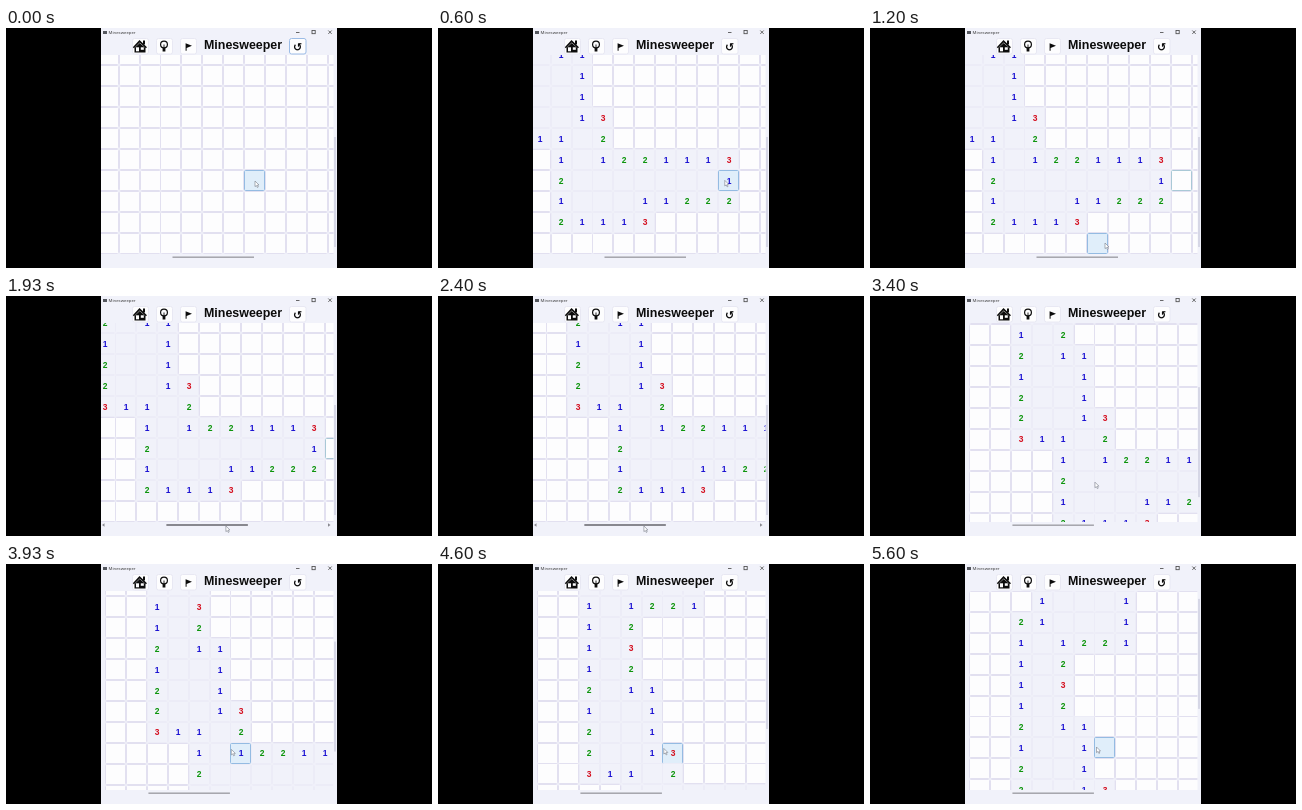
An HTML page with a canvas for the animation above (5670 ms loop, 426 by 240 pixels).

```html
<!DOCTYPE html>
<html lang="en">
<head>
<meta charset="utf-8">
<title>Minesweeper</title>
<style>
html, body { margin: 0; width: 100%; height: 100%; overflow: hidden; background: #000; }
canvas { display: block; width: 426px; height: 240px; }
</style>
</head>
<body>
<canvas id="stage" width="426" height="240"></canvas>
<script>
const ctx = document.getElementById('stage').getContext('2d');
const LOOP = 5670, TICK = 200 / 3;
const SIZE = 20.93, COLS = 15, ROWS = 16;
const LEFT = 28.9, TOP = -109.1;         // board corner before scrolling
const CLICK = 400, FOCUS = 730;
const BACK = '#f1f2fa', PAPER = '#fdfdfe', RIM = '#e2e0f0', BLACK = '#0c0c0c';
const INK = { 1: '#1a10d2', 2: '#0d950d', 3: '#d41020' };
const VIEW = { x: 95, y: 27, w: 232.5, h: 199 };

const MINES = [
  '..*.....*', '', '.*', '.....**', '.....*', '.*...*', '', '.*',
  '......*', '.*.....*', '.*.....**..*.*', '...*.........*', '', '...*',
  '.........*.**', '.....*..**'
];

const isMine = (c, r) => MINES[r] !== undefined && MINES[r][c] === '*';

function around(c, r) {
  const list = [];
  for (let y = r - 1; y <= r + 1; y++)
    for (let x = c - 1; x <= c + 1; x++)
      if (x >= 0 && y >= 0 && x < COLS && y < ROWS) list.push([x, y]);
  return list;
}

// Opening an empty cell opens its neighbours too.
const opened = new Map();
function open(c, r) {
  const id = r * COLS + c;
  if (opened.has(id)) return;
  const near = around(c, r);
  const count = near.filter(([x, y]) => isMine(x, y)).length;
  opened.set(id, count);
  if (!count) near.forEach(([x, y]) => open(x, y));
}
open(10, 12);

const ramp = (t, a, b) => Math.min(1, Math.max(0, (t - a) / (b - a)));

// Straight moves between [time, x, y] stops.
function along(stops, t) {
  let [, x, y] = stops[0];
  for (let i = 1; i < stops.length; i++) {
    const k = ramp(t, stops[i - 1][0], stops[i][0]);
    x += (stops[i][1] - stops[i - 1][1]) * k;
    y += (stops[i][2] - stops[i - 1][2]) * k;
  }
  return [x, y];
}

const PATH = [
  [430, 249, 153], [700, 309, 152], [800, 309, 152], [1200, 235, 215],
  [1530, 226, 230], [1730, 226, 230], [2530, 202, 230], [2800, 224.5, 187],
  [5600, 226.5, 183]
];

const scrollX = t => 70 * ramp(t, 1730, 2530);
const scrollY = t => 57.5 * ramp(t, 2700, 3930) + 78.5 * ramp(t, 3930, 5190);

function rect(x, y, w, h, color) {
  ctx.fillStyle = color;
  ctx.fillRect(x, y, w, h);
}

function stroke(color, width) {
  ctx.strokeStyle = color;
  ctx.lineWidth = width;
  ctx.stroke();
}

function box(x, y, w, h, fill, rim, radius = 1) {
  ctx.beginPath();
  ctx.roundRect(x, y, w, h, radius);
  ctx.fillStyle = fill;
  ctx.fill();
  stroke(rim, 1);
}

function shape(points, fill) {
  ctx.beginPath();
  points.forEach(([x, y]) => ctx.lineTo(x, y));
  ctx.closePath();
  ctx.fillStyle = fill;
  ctx.fill();
}

function line(x1, y1, x2, y2, color, width) {
  ctx.beginPath();
  ctx.moveTo(x1, y1);
  ctx.lineTo(x2, y2);
  stroke(color, width);
}

function text(str, x, y, font, color, align = 'left') {
  ctx.font = font;
  ctx.fillStyle = color;
  ctx.textAlign = align;
  ctx.fillText(str, x, y);
}

function drawCell(x, y, count, hover, focus) {
  const left = Math.round(x) + 0.5, top = Math.round(y) + 0.5, s = 20;
  const covered = count === undefined;
  if (hover && count !== 0) box(left, top, s, s, '#e0eefa', '#94bbe2');
  else if (covered) box(left, top, s, s, PAPER, focus ? '#a9c8d6' : RIM);
  else box(left, top, s, s, BACK, '#ececf7');
  if (count) {
    text(count, Math.round(x + SIZE / 2), Math.round(y + SIZE / 2 + 3),
      'bold 8.5px "Liberation Sans", Arial, sans-serif', INK[count], 'center');
  }
}

function drawBoard(t, sx, sy, px, py) {
  ctx.save();
  ctx.beginPath();
  ctx.rect(VIEW.x, VIEW.y, VIEW.w, VIEW.h);
  ctx.clip();
  const inside = py > VIEW.y && py < VIEW.y + VIEW.h;
  for (let r = 0; r < ROWS; r++) {
    for (let c = 0; c < COLS; c++) {
      const x = LEFT + c * SIZE + sx, y = TOP + r * SIZE + sy;
      const hover = inside && px >= x && px < x + SIZE && py >= y && py < y + SIZE;
      const count = t < CLICK ? undefined : opened.get(r * COLS + c);
      drawCell(x, y, count, hover, t >= FOCUS && c === 13 && r === 12);
    }
  }
  ctx.restore();
}

function drawBars(sx, sy, active) {
  const gray = '#88888f';
  rect(166.5 - sx * 0.344, active ? 228 : 228.6, 81.5, active ? 2 : 1.1, gray);
  if (active) {
    shape([[96, 229], [98.5, 227.3], [98.5, 230.7]], gray);
    shape([[324.5, 229], [322, 227.3], [322, 230.7]], gray);
  }
  rect(328.5, 109 - sy * 0.545, 1, 110, '#bcbcd2');
}

function drawHome() {
  rect(137, 12.5, 2, 4, BLACK);
  shape([[126.8, 19.2], [133.5, 12], [141, 19.2], [139.8, 20.2], [133.7, 14.6], [128, 20.2]], BLACK);
  shape([[128.5, 20], [133.7, 15], [139.5, 20], [139.5, 24.5], [128.5, 24.5]], BLACK);
  rect(130, 19.3, 3, 4, PAPER);
  rect(134.8, 19.3, 3, 2.5, PAPER);
}

function drawBulb() {
  ctx.beginPath();
  ctx.arc(158, 16.5, 3.4, 0, 7);
  stroke(BLACK, 1.2);
  line(158, 16.5, 158, 20, BLACK, 0.9);
  rect(156.6, 20, 2.8, 3.5, BLACK);
}

function drawHeader(t) {
  const gray = '#444';
  rect(97, 3, 4, 3, '#55585f');
  text('Minesweeper', 102.6, 6.2, '4.3px "Open Sans", sans-serif', '#333');
  line(290, 4.5, 293.5, 4.5, gray, 0.8);
  ctx.strokeRect(306, 2.5, 3.2, 3.2);
  line(322.3, 2.5, 325.7, 5.9, gray, 0.8);
  line(325.7, 2.5, 322.3, 5.9, gray, 0.8);

  for (let i = 0; i < 3; i++) box(126.5 + 24 * i, 10.5, 16, 15.5, PAPER, '#e8e8f3', 2);
  box(283.5, 10.5, 16.5, 15.5, PAPER, t < CLICK ? '#9cbce6' : '#e8e8f3', 2);
  drawHome();
  drawBulb();
  shape([[179.6, 15.2], [186, 17.8], [180.6, 20], [180.6, 22.7], [179.6, 22.7]], BLACK);
  text('↺', 291.7, 23.3, 'bold 11px "DejaVu Sans", sans-serif', BLACK, 'center');
  text('Minesweeper', 198, 21.2, 'bold 12.45px "Liberation Sans", Arial, sans-serif', BLACK);
}

function drawPointer(x, y) {
  ctx.save();
  ctx.translate(x, y);
  shape([[0, 0], [0, 5.6], [1.4, 4.5], [2.4, 6.5], [3.3, 6], [2.4, 4.1], [4, 4]], '#fff');
  stroke('#777c88', 0.6);
  ctx.restore();
}

function draw(t) {
  const sx = scrollX(t), sy = scrollY(t);
  const [px, py] = along(PATH, t);
  rect(0, 0, 426, 240, '#000');
  rect(95, 0, 236, 240, BACK);
  drawBoard(t, sx, sy, px, py);
  drawBars(sx, sy, py > VIEW.y + VIEW.h);
  drawHeader(t);
  drawPointer(px, py);
}

const start = performance.now();
function loop() {
  const t = (performance.now() - start) % LOOP;
  draw(Math.min(84, Math.floor((t + 3.5) / TICK)) * TICK);
  requestAnimationFrame(loop);
}
loop();
</script>
</body>
</html>
```
